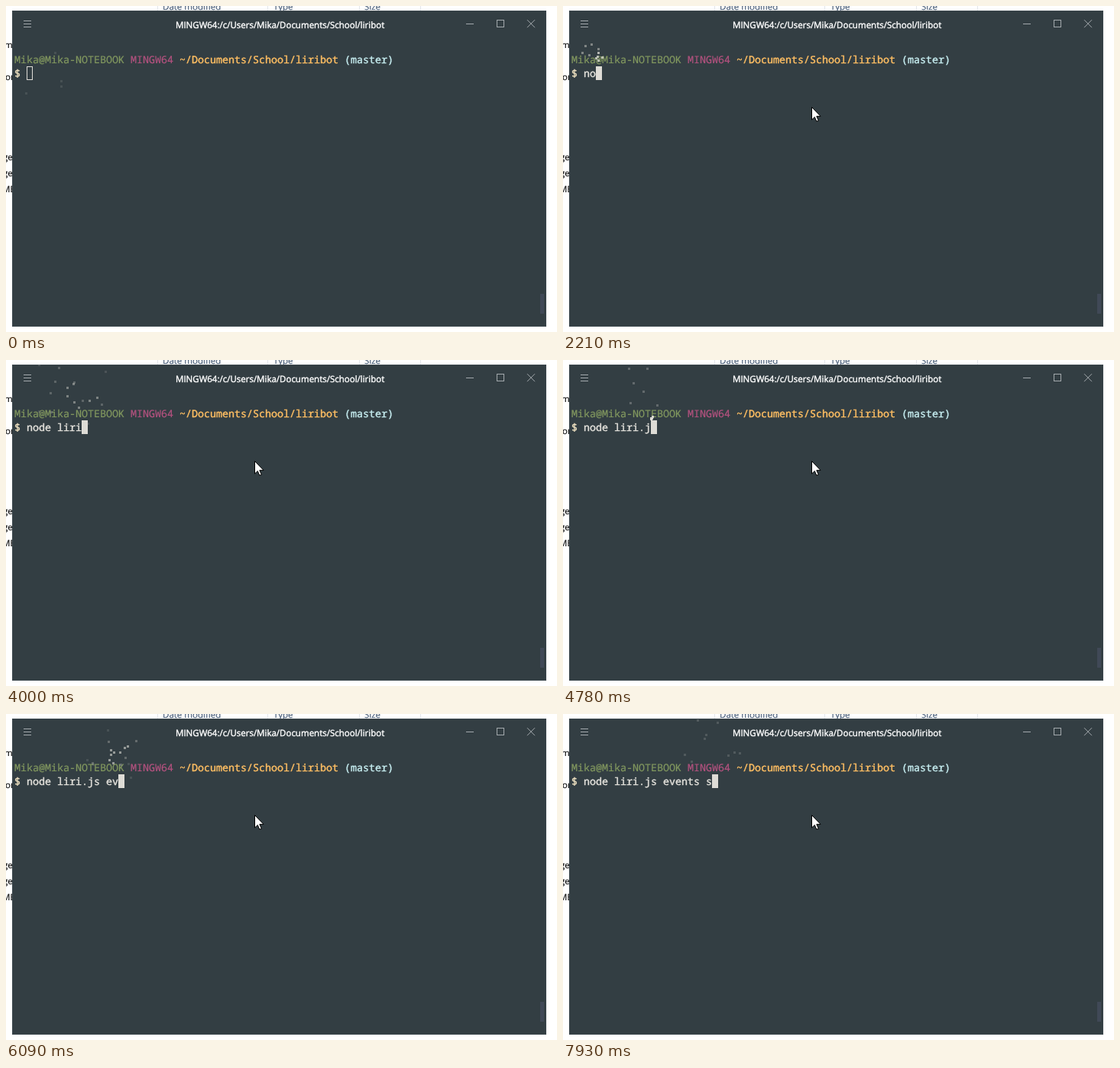
An HTML page with a canvas that plays this animation: 721 px wide and 427 px high, repeating every 8 s.

```html
<!DOCTYPE html>
<html lang="en">
<head>
<meta charset="utf-8">
<title>Terminal</title>
<style>
  html, body { margin: 0; width: 100%; height: 100%; overflow: hidden; background: #fff; }
  svg, canvas { position: absolute; left: 0; top: 0; width: 721px; height: 427px; }
  text {
    white-space: pre; text-rendering: geometricPrecision;
    fill: currentColor; stroke: currentColor; stroke-width: .2px;
  }
  .ui { font: 11.5px "Open Sans", "Noto Sans", sans-serif; }
  .title { font-size: 11.5px; color: #fff; stroke-width: .4px; }
  .mono { font: 13.333px "Noto Sans Mono", "DejaVu Sans Mono", monospace; }
  .strong { stroke-width: .4px; }
  .icon { fill: none; stroke: #a3a9ad; shape-rendering: crispEdges; }
</style>
</head>
<body>
<svg viewBox="0 0 721 427">
  <rect width="721" height="427" fill="#fff"/>
  <path d="M198.5 0V6M342.5 0V6M462.5 0V6M542.5 0V6" stroke="#e3e6ea"/>
  <g class="ui" color="#4c607a">
    <text x="205" y="5">Date modified</text>
    <text x="350" y="5">Type</text>
    <text x="469" y="5">Size</text>
  </g>
  <g class="ui" color="#111">
    <text x="-2" y="55">m</text>
    <text x="-1" y="97">or</text>
    <text x="-4" y="202">ge</text>
    <text x="-4" y="223">ge</text>
    <text x="-5" y="244">ME</text>
  </g>

  <rect x="8.5" y="6.5" width="698" height="413" fill="#333e43" stroke="#3d484e"/>
  <rect x="699" y="377" width="5" height="26" fill="#404957"/>
  <path class="icon" d="M23 19.5H33M23 23.5H33M23 27.5H33M602 23.5H612M642.5 18.5H651.5V27.5H642.5Z"/>
  <path d="M682 18.2L692 28.2M692 18.2L682 28.2" stroke="#a3a9ad" fill="none"/>
  <text class="ui title" x="222" y="28.5">MINGW64:/c/Users/Mika/Documents/School/liribot</text>

  <g class="mono">
    <text x="11" y="75" color="#82985f">Mika@Mika-NOTEBOOK</text>
    <text x="163" y="75" color="#b3527f">MINGW64</text>
    <text class="strong" x="227" y="75" color="#ffbf63">~/Documents/School/liribot</text>
    <text class="strong" x="443" y="75" color="#c6edf0">(master)</text>
    <text class="strong" x="11" y="93" color="#f0e2c2">$</text>
    <text class="strong" id="command" x="27" y="93" color="#e4e2dc"></text>
  </g>
  <rect id="caret" y="79.5" width="7" height="17" stroke="#dedcd6"/>
</svg>
<canvas id="sparks" width="721" height="427"></canvas>
<svg viewBox="0 0 721 427">
  <path id="pointer" d="M.5 .5V17L4.3 13.4L6.8 19.2L9.3 18.1L6.8 12.4H12Z" fill="#fff" stroke="#000"/>
</svg>
<script>
const LOOP = 8000, TYPING = 1830, STEP = 77.2;
const COMMAND = 'node liri.js events s';
const KEY_TIMES = [
  1830, 2030, 2230, 2430, 2670, 2980, 3200, 3440, 3670, 4260, 4740,
  5000, 5240, 5580, 5870, 6200, 6420, 6620, 6800, 7000, 7250
];
const POINTER = [
  [210, 529, 361], [290, 391, 238], [750, 372, 207], [830, 340, 157], [910, 325, 132]
];
const LEFTOVERS = [[63, 60], [71, 97], [71, 104], [25, 113]];

const command = document.getElementById('command');
const caret = document.getElementById('caret');
const pointer = document.getElementById('pointer');
const ctx = document.getElementById('sparks').getContext('2d');
const caretX = count => 27 + 8 * count;

let seed = 2017;
function random() {
  seed = (Math.imul(seed, 1664525) + 1013904223) >>> 0;
  return seed / 4294967296;
}

// Each key press throws 5 to 10 squares up from the caret.
const sparks = KEY_TIMES.flatMap((time, i) =>
  Array.from({ length: 5 + Math.round(random() * 5) }, () => ({
    time,
    x: caretX(i + 1),
    vx: random() * 2 - 1,
    vy: -3.5 + random() * 2
  }))
);

function dot(x, y, alpha) {
  ctx.globalAlpha = alpha;
  ctx.fillRect(Math.round(x), Math.round(y), 3, 3);
}

function drawSparks(t) {
  ctx.clearRect(0, 0, 721, 427);
  ctx.fillStyle = '#dedcd6';
  if (t < TYPING) {
    LEFTOVERS.forEach(([x, y]) => dot(x, y, 0.12));
    return;
  }
  for (const s of sparks) {
    const n = (t - s.time) * 0.06 + 1;
    const alpha = 0.96 ** n;
    if (n >= 1 && alpha > 0.1) {
      dot(s.x + s.vx * n, 80 + s.vy * n + 0.0375 * n * n, alpha);
    }
  }
}

function render(time) {
  const t = time < TYPING ? time
    : TYPING + Math.min(79, Math.floor((time - TYPING) / STEP + 0.02)) * STEP;

  const count = KEY_TIMES.filter(k => k <= t).length;
  command.textContent = COMMAND.slice(0, count);
  caret.setAttribute('x', caretX(count) + 0.5);
  caret.setAttribute('fill', t < 1140 ? 'none' : '#dedcd6');

  const spot = POINTER.filter(p => p[0] <= t).pop();
  pointer.style.display = spot ? '' : 'none';
  if (spot) pointer.setAttribute('transform', `translate(${spot[1]} ${spot[2]})`);

  drawSparks(t);
}

ctx.beginPath();
ctx.rect(8, 6, 699, 414);
ctx.clip();

const start = performance.now();
function tick() {
  render((performance.now() - start) % LOOP);
  requestAnimationFrame(tick);
}
tick();
</script>
</body>
</html>
```
